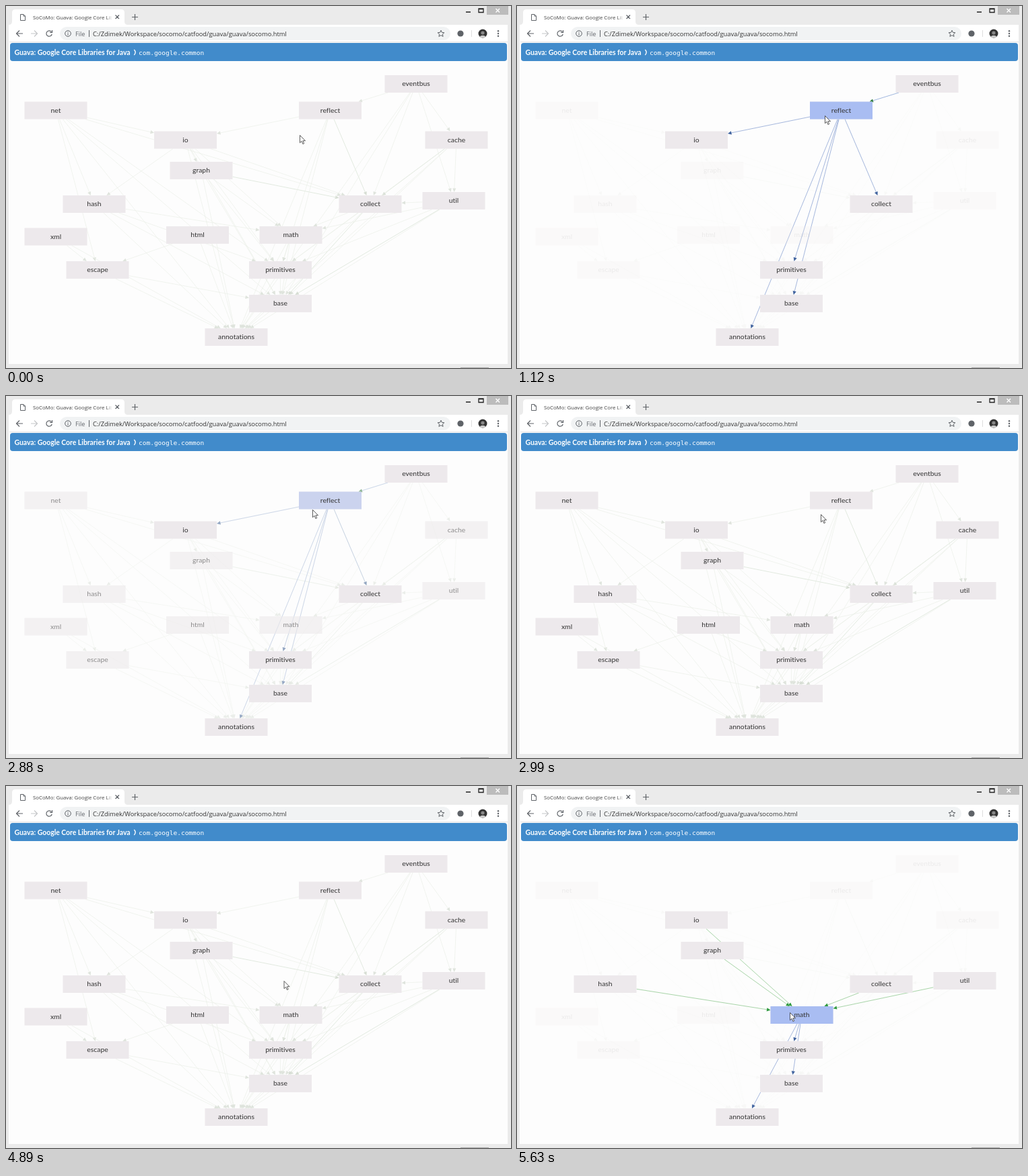
Animation of 750 by 539 pixels, one loop 8 s. Source, as an HTML page:

```html
<!DOCTYPE html>
<html lang="en">
<head>
<meta charset="utf-8">
<title>Package dependencies</title>
<style>
html, body { margin: 0; width: 100%; height: 100%; overflow: hidden; background: #ebebeb; }
svg { display: block; width: 750px; height: 539px; }
.ui { font-family: "Open Sans", "Noto Sans", sans-serif; }
.label { font: 10.4px Lato, sans-serif; font-variant-ligatures: none; text-anchor: middle; fill: #333; }
.icon { fill: none; stroke: #5f6368; stroke-width: 1.2; }
.thin { stroke-width: 1; }
.off { stroke: #c4c6c8; }
</style>
</head>
<body>
<svg viewBox="0 0 750 539">
  <defs>
    <linearGradient id="fade">
      <stop offset="0" stop-color="#fff" stop-opacity="0"/>
      <stop offset="1" stop-color="#fff"/>
    </linearGradient>
    <clipPath id="tab"><rect x="38" y="5" width="119" height="23"/></clipPath>
    <clipPath id="face"><circle cx="708" cy="41" r="6.5"/></clipPath>
  </defs>

  <!-- browser window -->
  <rect width="750" height="539" fill="#ebebeb"/>
  <path d="M4 28Q9 28 9 23V10Q9 5 14 5H171Q176 5 176 10V23Q176 28 181 28H745V533H4Z" fill="#fff"/>
  <rect x="5" y="54" width="740" height="479" fill="#fdfdfd"/>
  <rect x="5" y="53" width="740" height="1" fill="#e2e2e2"/>
  <rect x="675" y="538" width="42" height="1" fill="#aaa"/>
  <path class="icon thin" d="M21.5 12.5H26L28.5 15V21.5H21.5ZM26 12.5V15H28.5"/>
  <g class="ui">
    <text x="40" y="20" font-size="7.8" fill="#444" clip-path="url(#tab)">SoCoMo: Guava: Google Core Libraries</text>
    <rect x="149" y="8" width="9" height="17" fill="url(#fade)"/>
    <rect x="80" y="31" width="580" height="20" rx="10" fill="#f1f3f4"/>
    <text x="103" y="44.5" font-size="9" fill="#5f6368">File</text>
    <text x="129" y="44.5" font-size="9.3" fill="#333">C:/Zdimek/Workspace/socomo/catfood/guava/guava/socomo.html</text>
  </g>
  <path class="icon" d="M162.5 13.5L168 19M168 13.5L162.5 19M187 16.5H196M191.5 12V21"/>
  <path class="icon" d="M25 41H16M20 36.5L15.5 41L20 45.5"/>
  <path class="icon off" d="M37 41H46M42 36.5L46.5 41L42 45.5"/>
  <path class="icon" d="M67.5 38.5A4.2 4.2 0 1 0 68.2 42M68.5 36V39.5H65"/>
  <circle class="icon thin" cx="92" cy="41" r="4.3"/>
  <path class="icon thin" d="M92 40.5V43.5M92 38.3V39.5M123.5 36V46"/>
  <path class="icon thin" d="M646 36.2L647.4 39.4L650.9 39.7L648.3 42L649.1 45.4L646 43.6L642.9 45.4L643.7 42L641.1 39.7L644.6 39.4Z"/>
  <circle cx="675" cy="41" r="4.6" fill="#5f6368"/>
  <path d="M691.5 36V46" stroke="#ddd"/>
  <g clip-path="url(#face)">
    <rect x="701" y="34" width="14" height="14" fill="#333"/>
    <circle cx="708" cy="40" r="2.6" fill="#888"/>
    <ellipse cx="708" cy="47" rx="5" ry="3.2" fill="#ccc"/>
  </g>
  <g fill="#5f6368"><circle cx="731" cy="37.3" r="1.2"/><circle cx="731" cy="41" r="1.2"/><circle cx="731" cy="44.7" r="1.2"/></g>
  <path d="M683 9H690M702 4H709V9.5H702ZM702 4.5H709" fill="none" stroke="#222" stroke-width="1.3"/>
  <rect x="714" width="32" height="13" fill="#bcbcbc"/>
  <path d="M727.5 4L733 9.5M733 4L727.5 9.5" stroke="#fff" stroke-width="1.4"/>

  <!-- breadcrumb bar -->
  <rect x="6" y="55" width="738" height="27" rx="4" fill="#418bcb"/>
  <text x="12.5" y="72.5" fill="#fff" style="font:bold 10.4px Lato,sans-serif">Guava: Google Core Libraries for Java</text>
  <path d="M190.3 65Q194 69 190.3 73" fill="none" stroke="#fff" stroke-width="1.3"/>
  <text x="197" y="72.5" fill="#fff" style="font:9.5px 'DejaVu Sans Mono',monospace">com.google.common</text>

  <g id="idle"></g>
  <g id="hot-reflect"></g>
  <g id="hot-math"></g>
  <g id="nodes"></g>
  <path id="cursor" d="M0 0V11.2L2.6 8.8L4.4 13L6.2 12.2L4.4 8.2H8Z" fill="#fff" stroke="#333" stroke-width=".8"/>
</svg>
<script>
const $ = id => document.getElementById(id);
const W = 93, H = 26, LOOP = 8000;

const nodes = {
  net: [74, 155.5], io: [266.5, 199.5], graph: [290, 245], hash: [131, 295],
  xml: [74, 343.5], html: [284.5, 341], escape: [136, 393], math: [423, 341],
  reflect: [481.5, 155.5], eventbus: [609, 116], cache: [669, 199.5],
  collect: [541, 295], util: [665, 290], primitives: [407.5, 393],
  base: [407.5, 443], annotations: [342, 493]
};
const uses = {
  net: 'io hash escape collect primitives base annotations',
  io: 'graph hash collect math primitives base annotations',
  graph: 'collect math primitives base annotations',
  hash: 'math primitives base annotations',
  xml: 'escape annotations',
  html: 'escape annotations',
  escape: 'base annotations',
  math: 'primitives base annotations',
  reflect: 'io collect primitives base annotations',
  eventbus: 'reflect cache util collect base annotations',
  cache: 'util collect primitives base annotations',
  collect: 'math primitives base annotations',
  util: 'collect math primitives base annotations',
  primitives: 'base annotations',
  base: 'annotations'
};
const strong = 'cache-collect collect-base util-base reflect-collect graph-collect'.split(' ');
const edges = Object.entries(uses).flatMap(([a, list]) => list.split(' ').map(b => [a, b]));

// Centre-to-centre arrow cut off at both box borders
function arrow([a, b], line, head, width = 0.8) {
  const [ax, ay] = nodes[a], [bx, by] = nodes[b];
  const dx = bx - ax, dy = by - ay, len = Math.hypot(dx, dy);
  const cut = Math.min(W / 2 / Math.abs(dx), H / 2 / Math.abs(dy));
  const x = bx - dx * cut, y = by - dy * cut;
  const turn = Math.atan2(dy, dx) * 180 / Math.PI;
  return `<path d="M${ax + dx * cut} ${ay + dy * cut}L${x - dx / len * 4} ${y - dy / len * 4}" stroke="${line}" stroke-width="${width}"/>
    <path d="M0 0L-5.5 -2.6V2.6Z" fill="${head}" transform="translate(${x} ${y}) rotate(${turn})"/>`;
}

$('idle').innerHTML = edges.map(e => strong.includes(e.join('-'))
  ? arrow(e, '#dbe5d8', '#d6ddd3')
  : arrow(e, '#ebf0e9', '#dfe4dd', 0.7)).join('');

const incoming = { reflect: ['#8aa6d8', '#2f7d3c'], math: ['#93cb93', '#2f9a40'] };
for (const name in incoming) {
  $('hot-' + name).innerHTML = edges.filter(e => e.includes(name)).map(e =>
    e[1] === name ? arrow(e, ...incoming[name]) : arrow(e, '#90a6d6', '#40639f')).join('');
}

$('nodes').innerHTML = Object.entries(nodes).map(([name, [x, y]]) => {
  const box = `x="${x - W / 2}" y="${y - H / 2}" width="${W}" height="${H}"`;
  return `<rect id="box-${name}" ${box} fill="#ede9ec"/>` +
    (incoming[name] ? `<rect id="lit-${name}" ${box} fill="#a9bdf2"/>` : '') +
    `<text id="text-${name}" class="label" x="${x}" y="${y + 3.4}">${name}</text>`;
}).join('');

// Pointer steps: time, x, y
const steps = [
  [0, 436, 192], [500, 438, 184], [610, 444, 175], [750, 450, 167], [870, 455, 164], [1000, 457, 163],
  [2880, 455, 169], [2990, 451, 176], [3110, 446, 185], [3260, 440, 198], [3370, 434, 210],
  [3510, 431, 216], [3640, 429, 221], [3760, 428, 223],
  [4380, 427, 232], [4500, 424, 245], [4630, 420, 260], [4750, 416, 274],
  [4890, 412.5, 290], [5010, 409, 304], [5140, 407, 318], [5260, 405, 330], [5380, 405, 336], [5500, 405, 337]
];
// Hover fade steps: time, package, strength
const fades = [
  [0, 'reflect', 0], [750, 'reflect', 0.3], [870, 'reflect', 0.6], [1000, 'reflect', 0.85], [1120, 'reflect', 1],
  [2880, 'reflect', 0.5], [2990, 'reflect', 0],
  [5260, 'math', 0.3], [5380, 'math', 0.6], [5500, 'math', 0.85], [5630, 'math', 1]
];
const at = (list, t) => list.findLast(step => step[0] <= t);
const setOpacity = (id, v) => $(id).setAttribute('opacity', v);

function draw(now) {
  const t = now % LOOP;
  const [, x, y] = at(steps, t);
  const [, active, p] = at(fades, t);
  $('cursor').setAttribute('transform', `translate(${x + 0.5} ${y + 0.5})`);
  setOpacity('idle', 1 - 0.82 * p);
  for (const name in incoming) {
    const v = name === active ? p : 0;
    setOpacity('hot-' + name, v);
    setOpacity('lit-' + name, v);
  }
  for (const name in nodes) {
    const linked = name === active || edges.some(e => e.includes(name) && e.includes(active));
    setOpacity('box-' + name, linked ? 1 : 1 - 0.8 * p);
    setOpacity('text-' + name, linked ? 1 : 1 - 0.93 * p);
  }
}

const start = performance.now();
function tick() {
  draw(performance.now() - start);
  requestAnimationFrame(tick);
}
tick();
</script>
</body>
</html>
```
